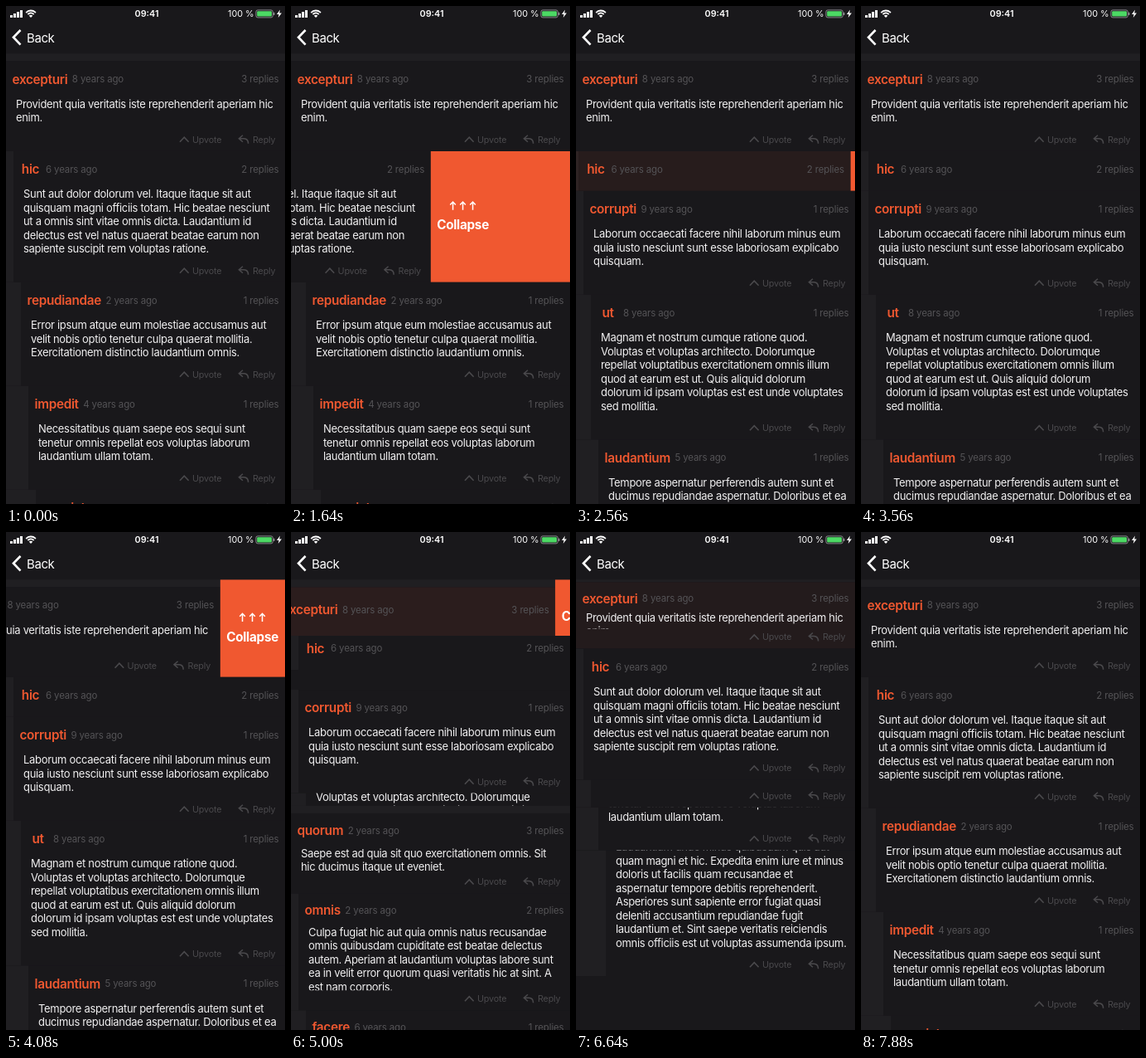
Animation of 337 by 600 pixels, one loop 7.96 s. Source, as an HTML page with a canvas:

```html
<!DOCTYPE html>
<html lang="en">
<head>
<meta charset="utf-8">
<title>Collapsible comments</title>
<style>
  html, body { margin: 0; width: 100%; height: 100%; overflow: hidden; background: #19181b; }
  canvas { display: block; width: 337px; height: 600px; }
</style>
</head>
<body>
<canvas id="stage"></canvas>
<script>
const W = 337, H = 600, LOOP = 7960, TOP = 57.3, LINE = 16.5, FOLDED = 48;
const BG = '#19181b', STRIP = '#201f22', ORANGE = '#f05830', MUTED = '#545356', FAINT = '#4a494c';
// Moments when the thread folds and unfolds
const FOLD_CHILD = 2060, FOLD_ROOT = 4640, UNFOLD = 6400;

const canvas = document.getElementById('stage');
const ctx = canvas.getContext('2d');
const dpr = window.devicePixelRatio || 1;
canvas.width = W * dpr;
canvas.height = H * dpr;

const comment = (name, depth, years, replies, body) => {
  const lines = body.split('|');
  return { name, depth, years, replies, lines, full: 75.5 + LINE * lines.length };
};

const rows = [
  comment('excepturi', 0, 8, 3, 'Provident quia veritatis iste reprehenderit aperiam hic|enim.'),
  comment('hic', 1, 6, 2, 'Sunt aut dolor dolorum vel. Itaque itaque sit aut|quisquam magni officiis totam. Hic beatae nesciunt|ut a omnis sint vitae omnis dicta. Laudantium id|delectus est vel natus quaerat beatae earum non|sapiente suscipit rem voluptas ratione.'),
  comment('repudiandae', 2, 2, 1, 'Error ipsum atque eum molestiae accusamus aut|velit nobis optio tenetur culpa quaerat mollitia.|Exercitationem distinctio laudantium omnis.'),
  comment('impedit', 3, 4, 1, 'Necessitatibus quam saepe eos sequi sunt|tenetur omnis repellat eos voluptas laborum|laudantium ullam totam.'),
  comment('eveniet', 4, 3, 0, 'Laudantium unde minus quibusdam quis aut|quam magni et hic. Expedita enim iure et minus|doloris ut facilis quam recusandae et|aspernatur tempore debitis reprehenderit.|Asperiores sunt sapiente error fugiat quasi|deleniti accusantium repudiandae fugit|laudantium et. Sint saepe veritatis reiciendis|omnis officiis est ut voluptas assumenda ipsum.'),
  comment('corrupti', 1, 9, 1, 'Laborum occaecati facere nihil laborum minus eum|quia iusto nesciunt sunt esse laboriosam explicabo|quisquam.'),
  comment('ut', 2, 8, 1, 'Magnam et nostrum cumque ratione quod.|Voluptas et voluptas architecto. Dolorumque|repellat voluptatibus exercitationem omnis illum|quod at earum est ut. Quis aliquid dolorum|dolorum id ipsam voluptas est est unde voluptates|sed mollitia.'),
  comment('laudantium', 3, 5, 1, 'Tempore aspernatur perferendis autem sunt et|ducimus repudiandae aspernatur. Doloribus et ea|quos nihil.'),
  comment('quorum', 0, 2, 3, 'Saepe est ad quia sit quo exercitationem omnis. Sit|hic ducimus itaque ut eveniet.'),
  comment('omnis', 1, 2, 2, 'Culpa fugiat hic aut quia omnis natus recusandae|omnis quibusdam cupiditate est beatae delectus|autem. Aperiam at laudantium voluptas labore sunt|ea in velit error quorum quasi veritatis hic at sint. A|est nam corporis.'),
  comment('facere', 2, 6, 1, 'Quod vero sit numquam et autem. Aut ipsam|nulla sequi dicta tenetur. Sunt error ut magni|eos et aut fugit. Velit quas nemo ab sint|odio harum culpa. Esse quis enim et vitae|nisi totam.'),
  comment('eligendi', 3, 7, 1, 'Nihil quo sint et autem ipsa.|Quas vel optio.')
];

const clamp = u => Math.max(0, Math.min(1, u));
const smooth = u => (u = clamp(u), u * u * (3 - 2 * u));
const ramp = (t, start, dur) => 1 - (1 - clamp((t - start) / dur)) ** 2;
const hump = (t, start, dur) => Math.sin(Math.PI * clamp((t - start) / dur));
const mix = (a, b, u) => a + (b - a) * u;
const swipe = (t, start, dur, peak, release) =>
  peak * (t < release ? smooth((t - start) / dur) : 1 - ramp(t, release, 600));
const fade = (t, start) => t < start ? 0 : 0.12 * (1 - clamp((t - start) / 1140));

// Height, gap above and look of row i at time t
function pose(i, t) {
  const full = rows[i].full, open = t >= UNFOLD;
  const s = { h: full, gap: 0, shift: 0, glow: 0, folded: false, squeeze: false, anchor: open ? 1 : 0.4 };
  if (i === 0) {
    s.gap = 9 - (open ? 7.2 * hump(t, UNFOLD, 763) : 0);
    s.folded = t >= FOLD_ROOT && !open;
    s.squeeze = open;
    s.h = open ? mix(FOLDED, full, ramp(t, UNFOLD, 763)) : mix(full, FOLDED, ramp(t, FOLD_ROOT, 480));
    s.box = open ? s.h : mix(full, FOLDED, ramp(t, FOLD_ROOT, 624));
    s.shift = swipe(t, 3720, 831, 195, 4583);
    s.glow = open ? fade(t, UNFOLD) * 0.45 : fade(t, FOLD_ROOT);
  } else if (i === 1) {
    s.folded = t >= FOLD_CHILD && !open;
    s.h = open ? full * ramp(t, UNFOLD, 220)
      : mix(full, FOLDED, ramp(t, FOLD_CHILD, 480)) * (1 - ramp(t, 5060, 400));
    s.shift = swipe(t, 1000, 877, 205, 2060);
    s.glow = fade(t, FOLD_CHILD);
  } else if (i < 5) {
    const [start, dur] = [[6552, 620], [6500, 603], [UNFOLD, 500]][i - 2];
    s.h = full * (open ? ramp(t, start, dur) : 1 - ramp(t, FOLD_CHILD, 500 - 40 * i));
  } else if (i < 8) {
    const [start, dur] = [[5000, 420], [FOLD_ROOT, 514], [FOLD_ROOT, 340]][i - 5];
    s.h = full * (1 - ramp(t, start, dur));
    if (i === 5) s.gap = 24 * hump(t, FOLD_ROOT, 720);
  } else {
    s.squeeze = !open;
    s.gap = i === 8 ? 9 : 0;
    if (open) s.h = full * (1 - ramp(t, UNFOLD, 200));
    else if (t >= FOLD_ROOT) s.h = full * mix(0.5, 1, ramp(t, FOLD_ROOT, 678));
  }
  s.box ??= s.h;
  return s;
}

// y is the middle of the capitals
function text(str, x, y, size, color, { weight = 400, spacing = 0, align = 'left' } = {}) {
  ctx.font = `${weight} ${size}px Inter, "Open Sans", sans-serif`;
  ctx.letterSpacing = spacing + 'px';
  ctx.textAlign = align;
  ctx.fillStyle = color;
  ctx.fillText(str, x, y + size * 0.36);
}

function rect(x, y, w, h, color) {
  ctx.fillStyle = color;
  ctx.fillRect(x, y, w, h);
}

function stroke(path, color, width) {
  ctx.strokeStyle = color;
  ctx.lineWidth = width;
  ctx.stroke(new Path2D(path));
}

function clip(x, y, w, h) {
  ctx.beginPath();
  ctx.rect(x, y, w, h);
  ctx.clip();
}

function header(r, y) {
  const x = 7.5 + 9 * r.depth;
  ctx.font = '600 15.3px Inter, "Open Sans", sans-serif';
  ctx.letterSpacing = '-0.3px';
  const w = ctx.measureText(r.name).width, slot = Math.max(w, 26);
  text(r.name, x + (slot - w) / 2, y, 15.3, ORANGE, { weight: 600, spacing: -0.3 });
  text(`${r.years} years ago`, x + slot + 5.5, y, 11.5, MUTED, { spacing: -0.15 });
  text(`${r.replies} replies`, 329.5, y, 11.5, MUTED, { spacing: -0.15, align: 'right' });
}

function body(r, y, bottom) {
  ctx.save();
  clip(0, 0, W, Math.max(0, bottom));
  r.lines.forEach((line, i) =>
    text(line, 12 + 9 * r.depth, y + i * LINE, 13, '#f1f0f1', { spacing: -0.32 }));
  ctx.restore();
}

function actions(y) {
  ctx.save();
  ctx.translate(0, y);
  stroke('M210 3 L215.3 -2.6 L220.6 3', FAINT, 1.6);
  stroke('M286 -5 L281.4 -1 L286 3 M281.6 -1 H287.5 Q292.6 -0.8 292.6 5', FAINT, 1.5);
  text('Upvote', 225, 0, 10.8, FAINT, { spacing: -0.2 });
  text('Reply', 298, 0, 10.8, FAINT, { spacing: -0.2 });
  ctx.restore();
}

function collapseLabel(s, y) {
  const left = W - s.shift, top = y - s.gap, h = s.box + s.gap;
  ctx.save();
  clip(left, top, s.shift, h);
  rect(left, top, s.shift, h, ORANGE);
  ctx.translate(left + 39, top + h / 2);
  for (const x of [-12, 0, 12])
    stroke(`M${x} -8 V-17.5 M${x - 3.3} -14.3 L${x} -17.8 L${x + 3.3} -14.3`, '#fff', 1.5);
  text('Collapse', 0, 10, 15.3, '#fff', { weight: 700, spacing: -0.3, align: 'center' });
  ctx.restore();
}

function drawRow(r, s, y) {
  const left = 9 * r.depth, missing = r.full - s.h;
  if (r.depth === 0) rect(0, y - s.gap, W, s.gap, STRIP);
  ctx.save();
  clip(0, y, W, s.box);
  ctx.translate(-s.shift, y);
  rect(0, 0, left, s.box, STRIP);
  rect(left, 0, W - left, s.box, BG);
  if (s.glow > 0) {
    ctx.globalAlpha = s.glow;
    rect(0, 0, W, s.box, ORANGE);
    ctx.globalAlpha = 1;
  }
  if (s.folded) {
    header(r, s.box / 2 - 2);
  } else if (s.squeeze) {
    header(r, 22 - Math.min(2, missing * 0.1));
    body(r, 52 - missing * 0.33, s.h - 24);
    actions(s.h - 14);
  } else {
    ctx.translate(0, -s.anchor * missing);
    header(r, 22);
    body(r, 52, r.full);
    actions(r.full - 14);
  }
  ctx.restore();
  if (s.shift > 0.1) collapseLabel(s, y);
}

function topBar() {
  rect(0, 0, W, 57, BG);
  for (let i = 0; i < 4; i++) rect(5 + i * 4, 11 - i * 2, 3, 3 + i * 2, '#fff');
  ctx.strokeStyle = '#fff';
  ctx.lineWidth = 1.8;
  for (const radius of [8, 5]) {
    ctx.beginPath();
    ctx.arc(30, 13.5, radius, -Math.PI * 0.76, -Math.PI * 0.24);
    ctx.stroke();
  }
  ctx.fillStyle = '#fff';
  ctx.fill(new Path2D('M30 14 L27.8 11.7 Q30 10 32.2 11.7 Z'));
  text('09:41', 170, 9.3, 10.8, '#fff', { weight: 600, align: 'center' });
  text('100 %', 268, 9.3, 10.8, '#fff');
  ctx.lineWidth = 0.8;
  ctx.strokeStyle = '#a5a4a7';
  ctx.beginPath();
  ctx.roundRect(301.9, 4.9, 20.4, 9, 2.2);
  ctx.stroke();
  ctx.fillStyle = '#4cd964';
  ctx.beginPath();
  ctx.roundRect(303.2, 6.2, 17.8, 6.4, 1);
  ctx.fill();
  rect(323.2, 7.8, 1.2, 3.2, '#a5a4a7');
  ctx.fillStyle = '#fff';
  ctx.fill(new Path2D('M331 4.5 L327 10 H329.6 L328.8 14 L333 8.4 H330.2 Z'));
  stroke('M17.5 29 L9 37.8 L17.5 46.6', '#fff', 2.7);
  text('Back', 25, 38.3, 15, '#fff', { spacing: -0.4 });
}

function draw(now) {
  const t = now % LOOP;
  ctx.setTransform(dpr, 0, 0, dpr, 0, 0);
  rect(0, 0, W, H, BG);
  let y = TOP;
  const visible = [];
  rows.forEach((r, i) => {
    const s = pose(i, t);
    if (s.h < 0.5) return;
    y += s.gap;
    if (y < H) visible.push([r, s, y]);
    y += s.h;
  });
  // Upper rows overlap the ones below
  visible.reverse().forEach(item => drawRow(...item));
  topBar();
  requestAnimationFrame(draw);
}
requestAnimationFrame(draw);
</script>
</body>
</html>
```
